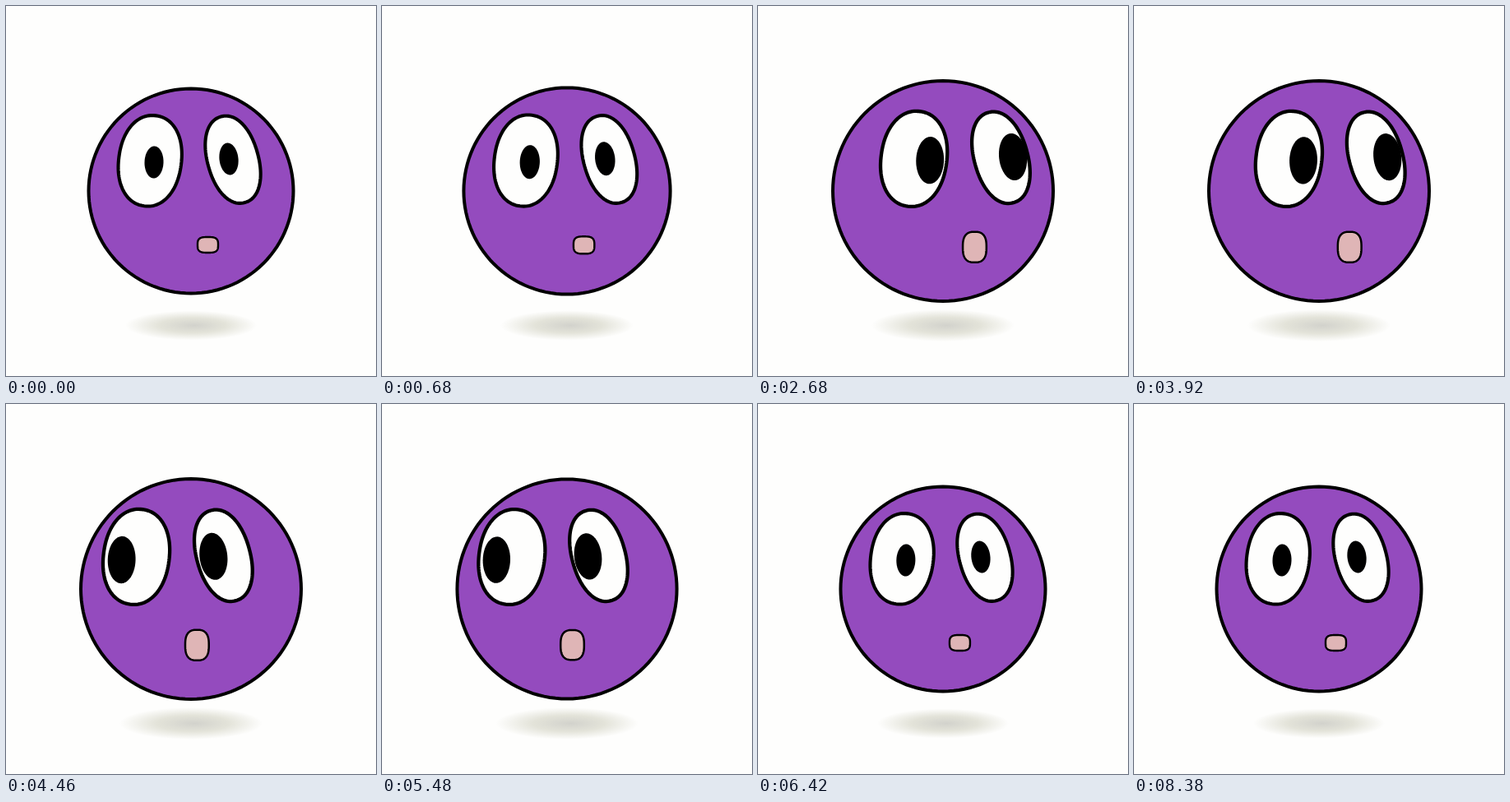
An HTML page with a canvas that plays this animation: 450x450 px, repeating every 8.48 s.

```html
<!DOCTYPE html>
<html lang="en">
<head>
<meta charset="utf-8">
<title>Surprised ball</title>
<style>
  html, body { margin: 0; width: 100%; height: 100%; overflow: hidden; background: #fefefd; }
  canvas { display: block; width: 450px; height: 450px; }
</style>
</head>
<body>
<canvas id="stage" width="450" height="450"></canvas>
<script>
const ctx = document.getElementById('stage').getContext('2d');
const LOOP = 8480, LAST = 179, SPAN = 35.5;
const PAPER = '#fefefd', PURPLE = '#944bbe', LIP = '#dfb5b6', INK = '#000';
const PIVOT = { x: 222, y: 236 };

// The look values move a pupil inside its eye.
const EYES = [
  { x: 175.2, y: 188.3, rx: 38.1, ry: 55.4, tilt: .13,
    pupil: { x: 180, y: 190, tilt: .03, lookRight: 15, lookLeft: -23.5 } },
  { x: 276, y: 186.8, rx: 30.9, ry: 54.2, tilt: -.27,
    pupil: { x: 271, y: 186, tilt: -.11, lookRight: 20.5, lookLeft: -7.7 } }
];

const mix = (a, b, k) => a + (b - a) * k;

function expoInOut(u) {
  if (u <= 0) return 0;
  if (u >= 1) return 1;
  return u < .5 ? .5 * 2 ** (20 * u - 10) : 1 - .5 * 2 ** (10 - 20 * u);
}

// Steps last 20, 20 and 100 ms in turn.
function stepAt(ms) {
  if (ms < 20) return 0;
  if (ms < 120) return 1;
  const t = ms - 120, part = t % 140;
  const step = 2 + 3 * Math.floor(t / 140) + (part < 20 ? 0 : part < 40 ? 1 : 2);
  return Math.min(step, LAST);
}

// A superellipse: power 2 is an oval, higher powers are squarer.
function shape(x, y, rx, ry, fill, { tilt = 0, power = 2, line = 0 } = {}) {
  const bend = v => Math.sign(v) * Math.abs(v) ** (2 / power);
  ctx.save();
  ctx.translate(x, y);
  ctx.rotate(tilt);
  ctx.beginPath();
  for (let i = 0; i < 120; i++) {
    const a = i * Math.PI / 60;
    ctx.lineTo(rx * bend(Math.cos(a)), ry * bend(Math.sin(a)));
  }
  ctx.closePath();
  ctx.fillStyle = fill;
  ctx.fill();
  if (line) {
    ctx.strokeStyle = INK;
    ctx.lineWidth = line;
    ctx.stroke();
  }
  ctx.restore();
}

function shadow(size) {
  const glow = ctx.createRadialGradient(.05, 0, 0, 0, 0, 1);
  glow.addColorStop(0, '#d2d2cc');
  glow.addColorStop(.5, '#e3e3d9');
  glow.addColorStop(1, PAPER);
  ctx.save();
  ctx.translate(225, 388.5);
  ctx.scale(mix(80, 87, size), mix(18, 19.5, size));
  shape(0, 0, 1, 1, glow);
  ctx.restore();
}

function draw(step) {
  const phase = n => expoInOut(step / SPAN - n);
  const size = phase(0) - phase(3);
  const right = phase(1) - phase(2);
  const left = phase(2) - phase(3);

  ctx.fillStyle = PAPER;
  ctx.fillRect(0, 0, 450, 450);
  shadow(size);

  const radius = mix(124.5, 134, size);
  shape(225, 225, radius, radius, PURPLE, { line: 4 });

  const zoom = mix(1, 1.05, size), open = mix(1, 1.4, size);
  ctx.save();
  ctx.translate(PIVOT.x + 18.2 * right - 15.8 * left, PIVOT.y);
  ctx.scale(zoom, zoom);
  ctx.translate(-PIVOT.x, -PIVOT.y);
  for (const { x, y, rx, ry, tilt, pupil } of EYES) {
    shape(x, y, rx, ry, PAPER, { tilt, power: 2.15, line: 4.1 });
    const look = pupil.lookRight * right + pupil.lookLeft * left;
    shape(pupil.x + look, pupil.y + 1.8 * left, 11.5 * open, 19.5 * open, INK, { tilt: pupil.tilt });
  }
  shape(245.5, 290.5, mix(12.5, 13.7, size), mix(9.5, 17.7, size), LIP,
    { power: mix(3.2, 2.7, size), line: 2.4 });
  ctx.restore();
}

const start = performance.now();
function tick() {
  draw(stepAt((performance.now() - start) % LOOP));
  requestAnimationFrame(tick);
}
tick();
</script>
</body>
</html>
```
